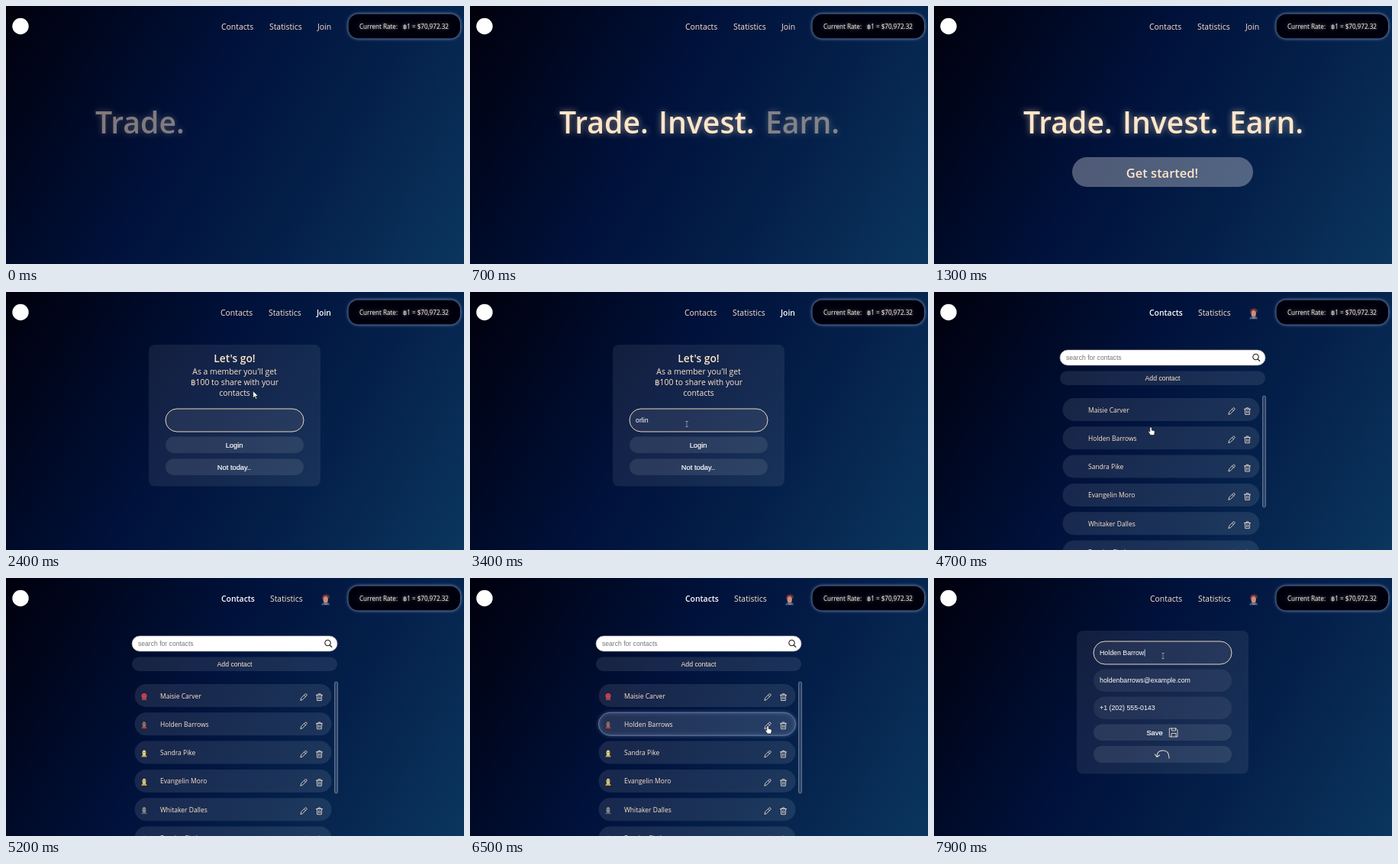
Write an HTML page that moves like this. It is 600 px wide and 338 px high and loops after 8000 ms.

```html
<!DOCTYPE html>
<html lang="en">
<head>
<meta charset="utf-8">
<title>Trade. Invest. Earn.</title>
<style>
  html, body { margin: 0; width: 100%; height: 100%; overflow: hidden; }
  body { background: linear-gradient(120deg, #00000c 0%, #00113a 40%, #04204a 68%, #0b365e 100%); }
  svg { display: block; width: 600px; height: 338px; }
  text { font-family: "Open Sans", "Noto Sans", "DejaVu Sans", sans-serif; fill: #ffe6ca; white-space: pre; }
  .ui { font-family: "Liberation Sans", Arial, sans-serif; fill: #fff; }
  .mid { text-anchor: middle; }
  .semi { font-weight: 600; }
  .label { stroke: #fff; stroke-width: .2; }
  .glow { filter: drop-shadow(0 0 4px #ffe4c488); }
  .rate { fill: #fff4e6; filter: drop-shadow(0 0 2px #ffffff88); }
  .icon { fill: none; stroke: #e8dccd; stroke-width: .9; stroke-linejoin: round; stroke-linecap: round; }
  .card { fill: #fff; fill-opacity: .075; }
  .pane { fill: #fff; fill-opacity: .095; }
  .field { fill: #fff; fill-opacity: .065; }
  .focus { stroke: #ffe9cf; stroke-width: .9; }
  .hover { stroke: #6f83a8; stroke-width: .9; filter: drop-shadow(0 0 2px #8fa8d8); }
</style>
</head>
<body>
<svg id="stage" viewBox="0 0 600 338"></svg>
<script>
const LOOP = 8000;
const stage = document.getElementById("stage");
const USER = "orlin";
const PERSON = "Holden Barrows";
const ROW_STEP = 37.3;

const contacts = [
  ["Maisie Carver", "#c8405c", "#8a4a3c"],
  [PERSON, "#8d7468", "#a8412f"],
  ["Sandra Pike", "#e5d27c", "#b9a650"],
  ["Evangelin Moro", "#e2c874", "#c9a44c"],
  ["Whitaker Dalles", "#8e8c86", "#56647c"],
  ["Bernice Slade", "#a05a6a", "#705a6a"]
];

const text = (x, y, size, str, cls = "", attrs = "") =>
  `<text x="${x}" y="${y}" font-size="${size}" class="${cls}" ${attrs}>${str}</text>`;
const rect = (x, y, w, h, r, cls = "", attrs = "") =>
  `<rect x="${x}" y="${y}" width="${w}" height="${h}" rx="${r}" class="${cls}" ${attrs}/>`;
const group = (id, inner, attrs = "") => `<g id="${id}" ${attrs}>${inner}</g>`;
const path = (d, cls = "icon", attrs = "") => `<path d="${d}" class="${cls}" ${attrs}/>`;

const button = (y, h, label) =>
  rect(209, y, 181, h, h / 2, "pane") + text(299, y + 14, 9.3, label, "ui mid label");

const header =
  `<circle cx="19" cy="26.5" r="10.7" fill="#fff"/>` +
  ["Contacts", "Statistics", "Join"].map((s, i) => text(0, 31, 10.4, s, "", `id="nav${i}"`)).join("") +
  group("face",
    path("M413 35.5q1-4 6-4t5 4z", "", 'fill="#3c5f88"') +
    `<ellipse cx="418.7" cy="28" rx="3.2" ry="4.6" fill="#c98f80"/>` +
    path("M414.5 29q-2-7.5 4.5-7.5q6 0 4.5 6q-1-3-4-3.5q-4 0-5 5z", "", 'fill="#7c2f30"') +
    path("M417 32.5l2 1.5 2-1.5v2.5h-4z", "", 'fill="#b47a6c"')) +
  rect(448.5, 10.5, 146.5, 32, 13, "", 'fill="#00000d" style="filter:drop-shadow(0 0 2px #9db4dc)"') +
  text(463, 30, 8.1, "Current Rate:", "rate") +
  text(520, 30, 8.15, "฿1 = $70,972.32", "rate");

const home =
  [["Trade.", 117], ["Invest.", 247], ["Earn.", 387]].map(([s, x], i) =>
    text(x, 166.5, 39.2, s, "semi glow", `id="word${i}"`)).join("") +
  group("start", rect(181, 198, 237, 39, 19.5, "", 'fill="#fff" fill-opacity=".31"') +
    text(299, 225, 16.5, "Get started!", "semi mid"));

const join =
  rect(187, 69, 225, 185.5, 8, "card") +
  text(299.5, 92, 13.8, "Let's go!", "semi mid") +
  ["As a member you'll get", "฿100 to share with your", "contacts"].map((s, i) =>
    text(299.5, 107.5 + i * 14.4, 10.4, s, "mid")).join("") +
  rect(209, 153, 181, 30, 15, "field focus") +
  text(217, 171, 8.8, "", "ui", 'id="login"') +
  button(189.5, 21.5, "Login") + button(218.5, 21.5, "Not today..");

const pencil = path("M-4 4l.7-2.8 5-5q1-1 2 0t0 2l-5 5zM.6-2.5l2 2");
const bin = path("M-4-2.7h8M-1.5-2.7v-1.5h3v1.5M-3.2-2.7l.4 7.2h5.6l.4-7.2M-1-.5v3M1-.5v3");

const row = ([name, head, body], i) => group("row" + i,
  rect(168.5, 139, 258, 30, 15, "pane", `id="pill${i}"`) +
  group("pic" + i,
    path("M177.5 160q0-3 3.5-3t3.5 3z", "", `fill="${body}"`) +
    `<ellipse cx="181" cy="154.5" rx="${i === 0 ? 3.5 : 2.4}" ry="3.6" fill="${head}"/>` +
    path("M180 154h.8M182 154h.8", "", 'stroke="#342f38" stroke-width=".9"')) +
  text(202, 157.5, 8.5, name) +
  `<g transform="translate(390 156)">${pencil}</g><g transform="translate(410.5 156)">${bin}</g>`,
  `transform="translate(0 ${i * ROW_STEP})"`);

const list =
  rect(165, 76, 269, 20, 10, "", 'fill="#fff" stroke="#b9b3ad" stroke-width=".6"') +
  text(173, 89, 8.6, "search for contacts", "ui", 'style="fill:#757575"') +
  path("M424.2 88l2.5 2.5M425.2 85a3.7 3.7 0 1 1-7.4 0a3.7 3.7 0 1 1 7.4 0", "icon",
    'style="stroke:#222;stroke-width:1.1"') +
  rect(165, 103.5, 269, 18.5, 9.2, "pane") +
  text(299.5, 115.7, 8.7, "Add contact", "ui mid", 'style="fill:#ffe6ca"') +
  contacts.map(row).join("") +
  rect(430.5, 136, 4, 146, 2, "", 'fill="#fff" fill-opacity=".16" stroke="#8590a8" stroke-width=".7"');

const edit =
  rect(187, 69, 225, 187.5, 8, "card") +
  rect(209, 83, 181, 30, 15, "field", 'id="nameBox"') +
  rect(209, 119.5, 181, 29.5, 14.7, "field") +
  rect(209, 155.5, 181, 29.5, 14.7, "field") +
  text(217, 101, 8.8, PERSON, "ui", 'id="name"') +
  text(217, 137, 8.8, "holdenbarrows@example.com", "ui") +
  text(217, 173, 8.8, "+1 (202) 555-0143", "ui") +
  button(191.5, 21.5, "") + text(289, 205.7, 9.3, "Save", "ui mid label") +
  path("M308.7 197h8l2.3 2v9h-10.300zM311.5 197v3h5v-3M311 208v-4.5h6v4.500") +
  button(220, 22, "") +
  path("M289.5 231l2.500 3.500 3.500-2.500M292 234q0-8 8-8t8 10", "icon", 'style="stroke-width:1.1"');

const pointers =
  group("arrow", path("M0 0v9l2.2-2 1.5 3.4 1.4-.7-1.5-3.2h3z", "", 'fill="#fff" stroke="#111" stroke-width=".6"')) +
  group("hand", path("M-1.2 1q0-1.5 1.2-1.5t1.2 1.5v2.5l3 .7q1.2.4 1 2l-.8 3.8h-4.8l-2.6-4q-.5-1.2.6-1.2l1.2 1z",
    "", 'fill="#fff" stroke="#111" stroke-width=".6"')) +
  group("beam", path("M-1.5-3.5h3M0-3.5v7M-1.5 3.5h3", "icon", 'style="stroke:#a5a9b4;stroke-width:.7"'));

stage.innerHTML = header + group("home", home) + group("join", join) + group("list", list) +
  group("edit", edit) + rect(0, 0, .8, 9, 0, "", 'id="caret" fill="#fff"') + group("pointer", pointers);

const el = {};
stage.querySelectorAll("[id]").forEach(n => el[n.id] = n);
const show = (id, on) => el[id].style.display = on ? "" : "none";
const clamp = v => Math.max(0, Math.min(1, v));
const smooth = v => v * v * (3 - 2 * v);

// start, end, from x/y, to x/y, shape
const moves = [
  [1450, 1900, 340, 130, 417, 28, "arrow"],
  [1900, 2050, 417, 28, 417, 28, "hand"],
  [2050, 2600, 417, 28, 284, 173, "arrow"],
  [2600, 3750, 284, 173, 284, 173, "beam"],
  [3750, 4850, 284, 177.5, 284, 177.5, "hand"],
  [5600, 6300, 290, 181, 390, 194, "hand"],
  [6300, 6750, 390, 194, 390, 194, "hand"],
  [6750, 7350, 390, 194, 300, 102, "arrow"],
  [7350, 8000, 300, 102, 300, 102, "beam"]
];

function movePointer(t) {
  const m = moves.find(([a, b]) => t >= a && t < b);
  show("pointer", m);
  if (!m) return;
  const [a, b, x0, y0, x1, y1, shape] = m;
  const k = smooth((t - a) / (b - a));
  el.pointer.setAttribute("transform", `translate(${x0 + (x1 - x0) * k} ${y0 + (y1 - y0) * k})`);
  ["arrow", "hand", "beam"].forEach(s => show(s, s === shape));
}

function placeCaret(field, y, on) {
  show("caret", on);
  if (!on) return;
  el.caret.setAttribute("x", 217.5 + field.getComputedTextLength());
  el.caret.setAttribute("y", y);
}

function draw(t) {
  const page = t < 1950 ? "home" : t < 3750 ? "join" : t < 6700 ? "list" : "edit";
  ["home", "join", "list", "edit"].forEach(p => show(p, p === page));

  const member = page === "list" || page === "edit";
  const navX = { home: [282, 345, 408], join: [281, 344, 407], list: [282, 346, 0], edit: [283, 346, 0] }[page];
  const active = { join: 2, list: 0 }[page];
  navX.forEach((x, i) => {
    const nav = el["nav" + i];
    nav.setAttribute("x", x);
    nav.style.fontWeight = i === active ? 600 : 400;
    nav.style.fill = i === active ? "#fff" : "";
  });
  show("nav2", !member);
  show("face", member);

  [-200, 200, 500].forEach((at, i) => el["word" + i].style.opacity = clamp((t - at) / 400));
  el.start.style.opacity = clamp((t - 800) / 400);

  el.login.textContent = USER.slice(0, Math.max(0, Math.floor((t - 2640) / 110)));
  contacts.forEach((c, i) => show("pic" + i, t >= 4800 + i * 50));
  el.pill1.setAttribute("class", t > 5600 ? "pane hover" : "pane");

  const focused = t >= 7450;
  el.nameBox.setAttribute("class", focused ? "field focus" : "field");
  el.name.textContent = t < 7850 ? PERSON : PERSON.slice(0, -1);

  if (page === "edit") placeCaret(el.name, 93.5, focused);
  else placeCaret(el.login, 163.5, page === "join" && t > 2600 && t < 3300);
  movePointer(t);
}

function tick() {
  draw(performance.now() % LOOP);
  requestAnimationFrame(tick);
}
tick();
</script>
</body>
</html>
```
